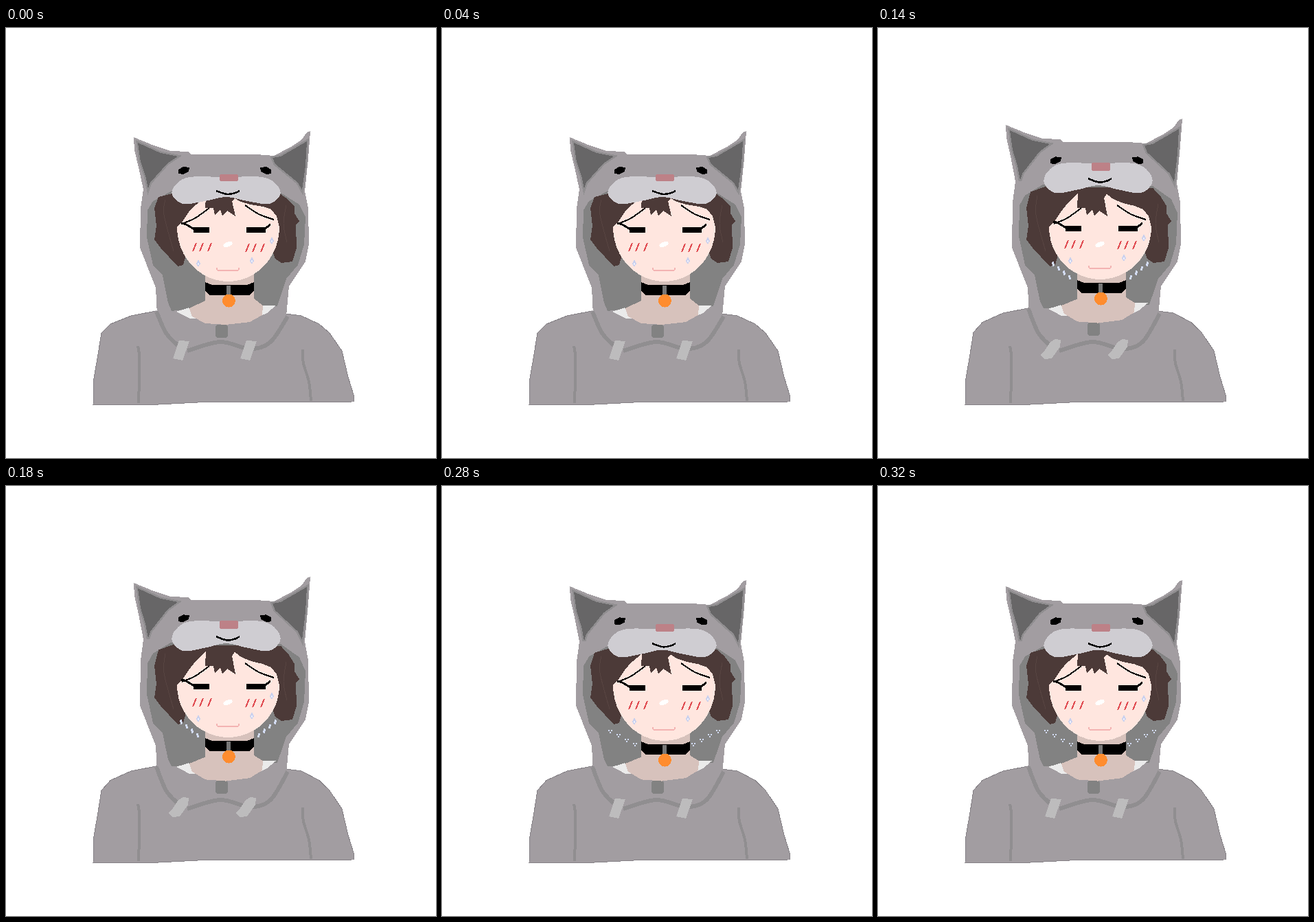
An HTML page for the animation above (0.35 s loop, 626 px wide and 626 px high).

```html
<!DOCTYPE html>
<html lang="en">
<head>
<meta charset="utf-8">
<title>Cat hood</title>
<style>
html, body { margin: 0; width: 100%; height: 100%; overflow: hidden; background: #fff; }
svg { display: block; width: 100vw; height: 100vh; }
</style>
</head>
<body>
<svg id="stage" viewBox="0 0 626 626" shape-rendering="crispEdges"></svg>
<script>
const STEP = 70;
const GREY = '#a29da1', SEAM = '#908e90', DARK = '#828282', STRING = '#bdbcbd';
const DROP = '#c9d0ee', SKIN = '#ffe6df', HAIR = '#4c3a38', LIGHT = '#d3dcf4';
const stage = document.getElementById('stage');

// vertical offsets per step; every other movement follows from these
const hoodLift = [0, -6, -18, -18, -13];
const brimLift = [0, -6, -16, -16, -7];
const chinBob = [0, -3, -3, 0, 2];
const cheekBob = [0, -2, -4, 0, 0];

const clamp = v => Math.max(0, Math.min(1, v));
const still = y => y;
const parse = text => text.split(' ').map(p => p.split(',').map(Number));
const bend = (pts, warp) => pts.map(([x, y]) => [x, warp(y)]);
const mirror = (pts, axis) => pts.map(([x, y]) => [2 * axis - x, y]).reverse();
const shift = (dx, dy, body) => `<g transform="translate(${dx} ${dy})">${body}</g>`;
const box = (x, y, w, h, fill, r = 0) =>
  `<rect x="${x}" y="${y}" width="${w}" height="${h}" rx="${r}" fill="${fill}"/>`;
const poly = (pts, fill, extra = '') => `<polygon points="${pts.join(' ')}" fill="${fill}" ${extra}/>`;
const shape = (text, fill, warp = still, extra) => poly(bend(parse(text), warp), fill, extra);

// smooth path through the points
function curve(pts, closed) {
  const n = pts.length;
  const at = i => closed ? pts[(i + n) % n] : pts[Math.max(0, Math.min(n - 1, i))];
  let d = 'M' + pts[0];
  for (let i = 0; i < (closed ? n : n - 1); i++) {
    const [a, b, c, e] = [at(i - 1), at(i), at(i + 1), at(i + 2)];
    const from = b.map((v, k) => v + (c[k] - a[k]) / 6);
    const to = c.map((v, k) => v - (e[k] - b[k]) / 6);
    d += `C${from} ${to} ${c}`;
  }
  return d;
}
const blob = (pts, fill) => `<path d="${curve(pts, true)}" fill="${fill}"/>`;
const stroke = (text, color, width, warp = still) =>
  `<path d="${curve(bend(parse(text), warp))}" fill="none" stroke="${color}" stroke-width="${width}"/>`;

function makePose(i) {
  const hood = hoodLift[i], brim = brimLift[i];
  const collar = Math.max(-4, hood / 3);
  const rise = y => clamp((320 - y) / 130);
  return {
    hood, chin: chinBob[i], cheek: cheekBob[i], collar,
    swing: i > 0 && i < 4,
    splash: i - 1,
    earX: i === 1 ? 3 : 0,
    lift: y => y + hood * rise(y),
    rim: y => y + brim * rise(y) + collar * clamp((y - 390) / 25),
    fringe: y => y + brim * clamp((262 - y) / 35),
    muzzle: y => y + brim * (1 + (256 - y) / 160),
    neck: y => y + collar * clamp((450 - y) / 30) * clamp((y - 385) / 20)
  };
}

function body(p) {
  return shape('127,548 128,510 134,475 139,444 152,431 182,419 218,412 408,416 430,419 456,431 471,444 ' +
    '489,470 498,508 506,534 506,544 279,545 222,548', GREY, p.neck, 'stroke="#858186"') +
    stroke('192,463 194,477 194,510 193,546', SEAM, 4) +
    stroke('432,468 433,488 441,515 444,543', SEAM, 4);
}

function hood(p) {
  const tip = 443 + p.earX;
  return shape('186,159 215,171 240,179 265,180 270,184 365,184 390,186 415,173 430,163 ' +
    `${tip - 5},152 ${tip},150 ${tip - 3},190 435,238 440,262 441,315 436,340 412,376 408,420 385,450 ` +
    '240,450 220,418 218,378 195,320 196,262 200,235 193,203 187,178', GREY, p.lift);
}

function collar(p) {
  return stroke('219,413 233,444 250,462', SEAM, 6, p.neck) +
    stroke('264,470 312,457 355,467 385,457 410,420', SEAM, 6, p.neck) +
    shift(0, p.collar * .8, box(305, 432, 18, 19, DARK, 4));
}

function opening(p) {
  return shape('240,238 214,252 206,265 205,305 214,345 228,360 236,400 241,412 268,409 375,405 ' +
    '395,405 408,365 425,345 434,315 436,275 427,257 400,240', DARK, p.rim);
}

function neck(p) {
  return shape('248,413 266,407 280,423 268,423', '#ebebeb', p.neck) +
    shape('370,404 393,404 380,415 360,424', '#ebebeb', p.neck) +
    shape('290,345 361,345 361,394 374,404 373,418 355,428 320,432 290,430 271,420 267,408 290,397',
      '#d7c2bc', p.neck) +
    shift(0, p.chin, choker());
}

function choker() {
  const half = parse('325.5,374 300,374 290,370 290,383 297,389 325.5,389');
  return poly([...half, ...mirror(half, 325.5)], '#000') +
    box(321, 375, 6, 14, '#777') +
    '<circle cx="324.5" cy="397" r="9.5" fill="#ff8c2e"/>';
}

function hair(p) {
  return shape('216,262 222,246 242,241 400,242 411,250 420,260 420,270 427,281 422,286 423,320 417,340 ' +
    '401,342 392,336 380,300 270,300 258,345 250,347 225,320 216,308 219,288', HAIR, p.fringe) +
    stroke('232,250 230,272 244,325', '#574441', 1, p.fringe) +
    stroke('408,258 404,285 409,312', '#574441', 1, p.fringe);
}

function face(p) {
  const jaw = [];
  for (let a = 0; a <= Math.PI; a += Math.PI / 24)
    jaw.push([323.5 + 74.5 * Math.cos(a), 290 + (79 + p.chin) * Math.sin(a)]);
  const bangs = parse('258,280 266,268 274,259 291,247 290,262 302,262 304,273 312,264 315,274 322,266 ' +
    '334,274 329,252 333,248 342,253 356,257 374,260 386,264 394,274');
  return poly([...jaw, ...bend(bangs, p.fringe)], SKIN);
}

function features(p) {
  const blush = x => stroke(`${x + 5},313 ${x},325`, '#e04a50', 2);
  const blushes = [272, 282, 294].map(blush).join('');
  const tears = parse('280,343 358,339 387,310').map(([x, y]) =>
    poly([[x, y - 6], [x + 3, y], [x, y + 5], [x - 3, y]], DROP) + box(x - 1, y - 1, 2, 3, '#eceffb')).join('');
  return stroke('256,285 275,277 296,262', '#000', 2) +
    stroke('348,258 368,271 390,279', '#000', 2) +
    shift(0, p.cheek / 2,
      stroke('255,284 262,286 274,293', '#000', 3) +
      stroke('376,293 385,286', '#000', 3) +
      box(273, 290, 23, 8, '#000') + box(350, 290, 28, 8, '#000')) +
    '<ellipse cx="323" cy="315" rx="7" ry="3.5" fill="#fff" transform="rotate(-20 323 315)"/>' +
    shift(0, p.cheek, blushes + shift(77, 1, blushes) + tears) +
    shift(0, p.chin, stroke('307,349 310,353 336,353 339,349', '#f3b3b2', 2));
}

function ears(p) {
  const rim = `stroke="${SEAM}" stroke-width="5" paint-order="stroke"`;
  const tip = 438 + p.earX;
  return shape('192,167 225,182 250,187 235,197 210,225 207,234 203,215 196,195', '#676667', p.lift, rim) +
    shape(`${tip},165 400,187 388,189 392,198 425,225 431,236 436,200`, '#676667', p.lift, rim);
}

function muzzle(p) {
  const half = parse('320.5,217 268,217 247,228 242,243 258,256 290,252 320.5,246');
  const eye = parse('251,206 258,202 267,203 266,209 258,213 251,212');
  return shift(0, p.hood * .82, poly(eye, '#000') + poly(mirror(eye, 318.5), '#000')) +
    blob(bend([...half, ...mirror(half.slice(1, -1), 320.5)], p.muzzle), '#cfcdd2') +
    stroke('306,237 314,240 323,242 334,240 340,237', '#000', 2.5, p.muzzle) +
    box(311, p.lift(213) + p.hood * .12, 27, 10 - p.hood / 9, '#bd8187', 3);
}

function strings(p) {
  const [form, gap] = p.swing
    ? ['251,457 258,453 266,454 265,464 253,481 243,482 236,476 243,469', 98]
    : ['252,455 267,456 257,484 243,481', 98];
  const cord = shape(form, STRING);
  return cord + shift(gap, 0, cord);
}

// beads of sweat fly outwards, get smaller and break up
function splash(p) {
  const s = p.splash;
  if (s < 1) return '';
  const bead = (x, y, side) =>
    s === 1 ? stroke(`${x - side},${y - 3} ${x + side},${y + 3}`, LIGHT, 3)
    : s === 2 ? box(x - 2, y - 2, 4, 3, LIGHT)
    : [[-3, -2], [1, -2], [-1, 1]].map(([dx, dy]) => box(x + dx, y + dy, 2, 2, LIGHT)).join('');
  let out = '';
  for (let k = 0; k < 4; k++) {
    const x = 260 - 5 * s + k * (6 + 2 * s), y = 337 + 6.5 * (s + k);
    out += bead(x, y, 1) + bead(647 - x, y, -1);
  }
  return out;
}

const layers = [body, hood, collar, opening, neck, hair, face, features, ears, muzzle, strings, splash];
const start = performance.now();
let shown = -1;

function draw(time) {
  const i = Math.floor(time / STEP) % hoodLift.length;
  if (i === shown) return;
  shown = i;
  const pose = makePose(i);
  stage.innerHTML = layers.map(layer => layer(pose)).join('');
}

function tick() {
  draw(performance.now() - start);
  requestAnimationFrame(tick);
}
tick();
</script>
</body>
</html>
```
